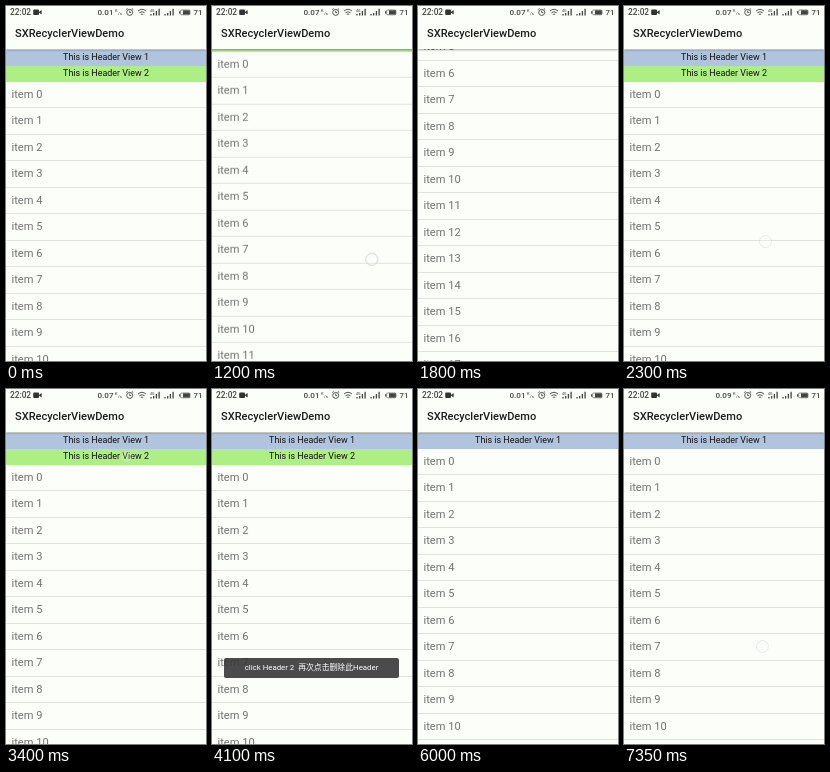
An HTML page for the animation above (8000 ms loop, 200 by 355 pixels).

```html
<!DOCTYPE html>
<html lang="en">
<head>
<meta charset="utf-8">
<title>SXRecyclerViewDemo</title>
<style>
  html, body { margin: 0; width: 100%; height: 100%; overflow: hidden; background: #fcfefa; }
  body { font-family: Roboto, "Noto Sans CJK SC", "Noto Sans CJK", sans-serif; }
  #stage { position: relative; width: 200px; height: 355px; overflow: hidden; background: #fcfefa; }
  #stage * { box-sizing: border-box; }

  /* every animated part shares the same 8 s clock */
  .list, .rows, .second, .net div, .touch, .toast { animation: 8s linear infinite; }

  .bar { position: absolute; inset: 0 0 auto; height: 43px; background: #fcfefa;
    box-shadow: 0 1px 2px rgba(0, 0, 0, .34); }
  .bar svg { position: absolute; left: 0; top: 0; }
  .status { position: absolute; top: 0; font-size: 8.3px; line-height: 13px; font-weight: 500; color: #444; }
  .title { position: absolute; left: 9px; top: 20px; font-size: 11.05px; line-height: 16px;
    font-weight: 500; color: #1c1c1c; white-space: nowrap; }
  .net { left: 91.5px; height: 13px; width: 19px; overflow: hidden; font-size: 8.1px; }
  .net div { animation-name: net; animation-timing-function: step-end; }
  .net span { display: block; height: 13px; }

  .list { position: absolute; left: 0; top: 43.8px; width: 200px; animation-name: scroll; }
  .head { height: 16px; line-height: 15.4px; font-size: 8.95px; text-align: center; color: #111;
    background: #b0c4de; }
  .second { background: #adee85; animation-name: remove; }
  .rows { animation-name: close; }
  .row { height: 26.5px; padding-left: 5.5px; line-height: 26.5px; font-size: 11.1px; color: #727272;
    border-bottom: 1px solid #e1e3df; }

  .toast { position: absolute; left: 12px; top: 269px; width: 175px; height: 20px; border-radius: 2px;
    background: rgba(56, 56, 56, .9); color: #fff; font-size: 7.85px; line-height: 20px;
    text-align: center; white-space: pre; animation-name: toast; }
  .touch { position: absolute; left: -6.5px; top: -6.5px; width: 13px; height: 13px; border-radius: 50%;
    border: 1px solid #c9cbc8; background: rgba(255, 255, 255, .45); animation-name: touch; }

  @keyframes net {
    0% { transform: none; }
    11.875% { transform: translateY(-13px); }
    49.375% { transform: none; }
    86.875%, 100% { transform: translateY(-26px); }
  }
  @keyframes scroll {
    0% { transform: translateY(0); }
    13.125% { transform: translateY(0); animation-timing-function: steps(9); }
    18.75% { transform: translateY(-90.7px); animation-timing-function: steps(3); }
    20.625% { transform: translateY(-140px); animation-timing-function: steps(3); }
    22.5% { transform: translateY(-180px); animation-timing-function: steps(2); }
    23.75% { transform: translateY(-190px); animation-timing-function: steps(7); }
    28.125% { transform: translateY(0); }
    85% { transform: translateY(0); animation-timing-function: steps(5); }
    88.125% { transform: translateY(-42px); animation-timing-function: steps(5); }
    91.25%, 100% { transform: translateY(0); }
  }
  @keyframes remove {
    0% { opacity: 1; }
    66.875% { opacity: 1; animation-timing-function: steps(3); }
    68.75%, 100% { opacity: 0; }
  }
  @keyframes close {
    0% { transform: translateY(0); }
    68.75% { transform: translateY(0); animation-timing-function: steps(6); }
    72.5%, 100% { transform: translateY(-16px); }
  }
  @keyframes toast {
    0% { opacity: 0; }
    43.75% { opacity: 0; animation-timing-function: steps(5); }
    46.875% { opacity: 1; }
    66.25% { opacity: 1; animation-timing-function: steps(5); }
    69.375%, 100% { opacity: 0; }
  }
  @keyframes touch {
    0% { transform: translate(160px, 282px); opacity: 0; animation-timing-function: step-end; }
    13.75% { transform: translate(160px, 274px); opacity: .9; animation-timing-function: steps(8); }
    18.75% { transform: translate(157px, 189px); opacity: .9; animation-timing-function: steps(3); }
    20.625% { transform: translate(156px, 140px); opacity: 0; animation-timing-function: step-end; }
    24.375% { transform: translate(145px, 72px); opacity: .4; animation-timing-function: steps(7); }
    28.75% { transform: translate(141px, 235px); opacity: .4; animation-timing-function: steps(4); }
    31.25% { transform: translate(140px, 275px); opacity: 0; animation-timing-function: step-end; }
    42.5% { transform: translate(120px, 67px); opacity: .4; animation-timing-function: step-end; }
    43.75% { transform: translate(120px, 67px); opacity: 0; animation-timing-function: step-end; }
    66.25% { transform: translate(120px, 67px); opacity: .4; animation-timing-function: step-end; }
    67.5% { transform: translate(120px, 67px); opacity: 0; animation-timing-function: step-end; }
    85.625% { transform: translate(140px, 250px); opacity: .4; animation-timing-function: steps(4); }
    88.125% { transform: translate(139px, 214px); opacity: .4; animation-timing-function: steps(6); }
    91.875%, 100% { transform: translate(138px, 257px); opacity: .4; }
  }
</style>
</head>
<body>
<div id="stage">
  <div class="list">
    <div class="head">This is Header View 1</div>
    <div class="head second">This is Header View 2</div>
    <div class="rows"></div>
  </div>

  <div class="bar">
    <span class="status" style="left:4px">22:02</span>
    <div class="status net"><div><span>0.01</span><span>0.07</span><span>0.09</span></div></div>
    <span class="status" style="left:187.5px;font-size:7.8px">71</span>
    <svg width="200" height="14" fill="none" stroke="#444" stroke-width=".9">
      <g fill="#333" stroke="none">
        <rect x="27.2" y="3.6" width="5.8" height="5.4" rx="1"/>
        <path d="M32.6 6.3 35.6 4V8.6Z"/>
        <text x="109" y="6.4" font-size="4">K</text>
        <text x="112" y="9.4" font-size="4.4">/s</text>
        <text x="144" y="5.6" font-size="3.6">4G</text>
      </g>
      <circle cx="123.7" cy="6.4" r="3"/>
      <path d="M123.7 4.6V6.6H125.2M120.2 3.6 121.6 2.4M127.2 3.6 125.8 2.4"/>
      <path d="M132 5Q136 1.6 140 5M133.4 6.8Q136 4.6 138.6 6.8M134.8 8.5Q136 7.6 137.2 8.5"/>
      <path stroke-width="1.3" d="M145 9.5V8M147.7 9.5V7M150.4 9.5V5M153.1 9.5V2.8M159 9.5V8M161.7 9.5V7M164.4 9.5V5M167.1 9.5V2.8"/>
      <rect x="174.6" y="4" width="9.4" height="4.8" rx="1" stroke-width=".6"/>
      <path stroke-width="1" d="M173.6 5.2V7.6"/>
      <rect x="177" y="4.3" width="6.8" height="4.2" fill="#444" stroke="none"/>
    </svg>
    <div class="title">SXRecyclerViewDemo</div>
  </div>

  <div class="toast">click Header 2  再次点击删除此Header</div>
  <div class="touch"></div>
</div>
<script>
  const rows = document.querySelector(".rows");
  for (let i = 0; i < 20; i++) {
    const row = document.createElement("div");
    row.className = "row";
    row.textContent = "item " + i;
    rows.append(row);
  }
</script>
</body>
</html>
```
